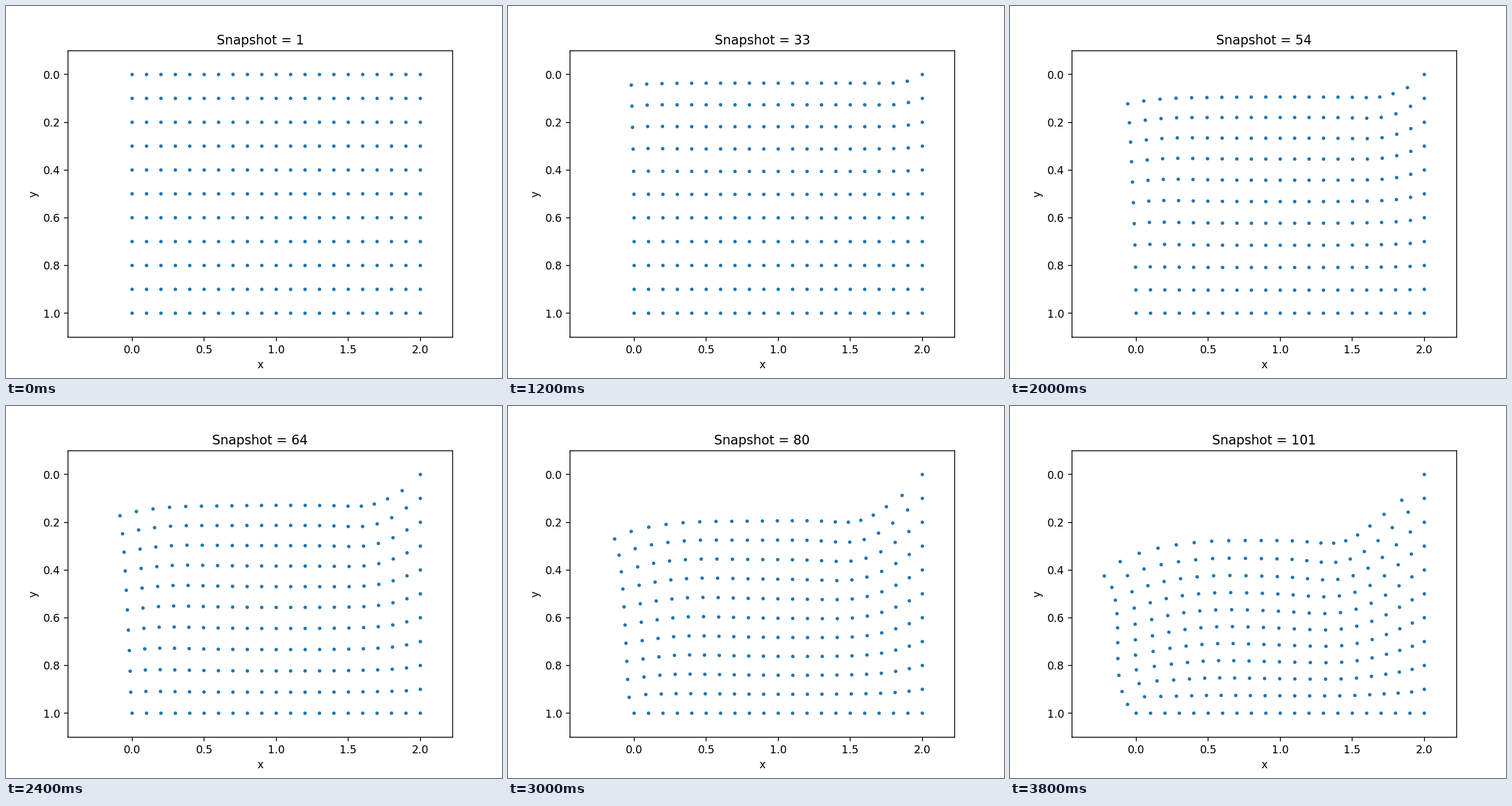
Animation of 864x648 px, one loop 4000 ms. Source, as a matplotlib script:

```python
"""Elastic block, clamped below and on the right, under a growing top load."""
import matplotlib.pyplot as plt
import numpy as np
from matplotlib.animation import FuncAnimation

plt.rcParams["font.family"] = "DejaVu Sans"

NX, NY, H = 20, 10, 0.1          # cells and cell size
E, NU = 2.7, 0.35                # neo-Hookean material, unit density
MU = E / (2 * (1 + NU))
LAM = E * NU / ((1 + NU) * (1 - 2 * NU))
SNAPS, SUBSTEPS = 100, 10
FRAMES, INTERVAL = 20, 200

CORNERS = [(0, 0), (0, 1), (1, 0), (1, 1)]   # (row, column) offsets


def traction(t):
    """Downward load on the top edge, easing to its peak at t = 1."""
    return np.sin(np.pi * t / 2)


def shape_gradients():
    """Gradients of the bilinear shape functions at 2x2 Gauss points."""
    pts = 0.5 + np.array([-0.5, 0.5]) / np.sqrt(3)
    grads = []
    for t in pts:
        for s in pts:
            ws, wt = (1 - s, s), (1 - t, t)
            grads.append([((2 * i - 1) * wt[j] / H, (2 * j - 1) * ws[i] / H)
                          for j, i in CORNERS])
    return np.array(grads)


GRAD = shape_gradients()


def internal_force(u):
    cells = np.stack([u[j:j + NY, i:i + NX] for j, i in CORNERS], axis=2)
    F = np.eye(2) + np.einsum("yxac,gad->yxgcd", cells, GRAD)
    inv_t = np.linalg.inv(F).swapaxes(-1, -2)
    log_j = np.log(np.linalg.det(F))[..., None, None]
    stress = MU * (F - inv_t) + LAM * log_j * inv_t
    f = np.einsum("yxgcd,gad->yxac", stress, GRAD) * H * H / 4
    total = np.zeros_like(u)
    for a, (j, i) in enumerate(CORNERS):
        total[j:j + NY, i:i + NX] += f[:, :, a]
    return total


def simulate():
    """Displacements of all nodes at every snapshot."""
    wx, wy = np.ones(NX + 1), np.ones(NY + 1)
    wx[[0, -1]] = wy[[0, -1]] = 0.5
    mass = (H * H * np.outer(wy, wx))[..., None]
    load = np.zeros((NY + 1, NX + 1, 2))
    load[0, :, 1] = H * wx
    free = np.ones_like(mass)
    free[-1] = 0
    free[:, -1] = 0

    u, v = np.zeros_like(load), np.zeros_like(load)
    dt = 1 / (SNAPS * SUBSTEPS)
    states = [u.copy()]
    for step in range(SNAPS * SUBSTEPS):
        v += dt * free * (load * traction(step * dt) - internal_force(u)) / mass
        u += dt * v
        if (step + 1) % SUBSTEPS == 0:
            states.append(u.copy())
    return states


grid = np.stack(np.meshgrid(np.arange(NX + 1) * H, np.arange(NY + 1) * H), axis=-1)
states = simulate()
shown = np.linspace(1, SNAPS + 1, FRAMES).round().astype(int)

fig, ax = plt.subplots(figsize=(6.4, 4.8), dpi=135)
# One size per dot keeps the dots off the pixel grid, so they move smoothly.
start = grid.reshape(-1, 2)
dots = ax.scatter(*start.T, s=np.full(len(start), 5.0), color="tab:blue")
ax.set(xlim=(-0.445, 2.2225), ylim=(1.1, -0.1), xlabel="x", ylabel="y")
title = ax.set_title("")


def update(k):
    n = shown[k]
    dots.set_offsets((grid + states[n - 1]).reshape(-1, 2))
    title.set_text(f"Snapshot = {n}")
    return dots, title


anim = FuncAnimation(fig, update, frames=FRAMES, interval=INTERVAL,
                     repeat=True, repeat_delay=0)
plt.show()
```
